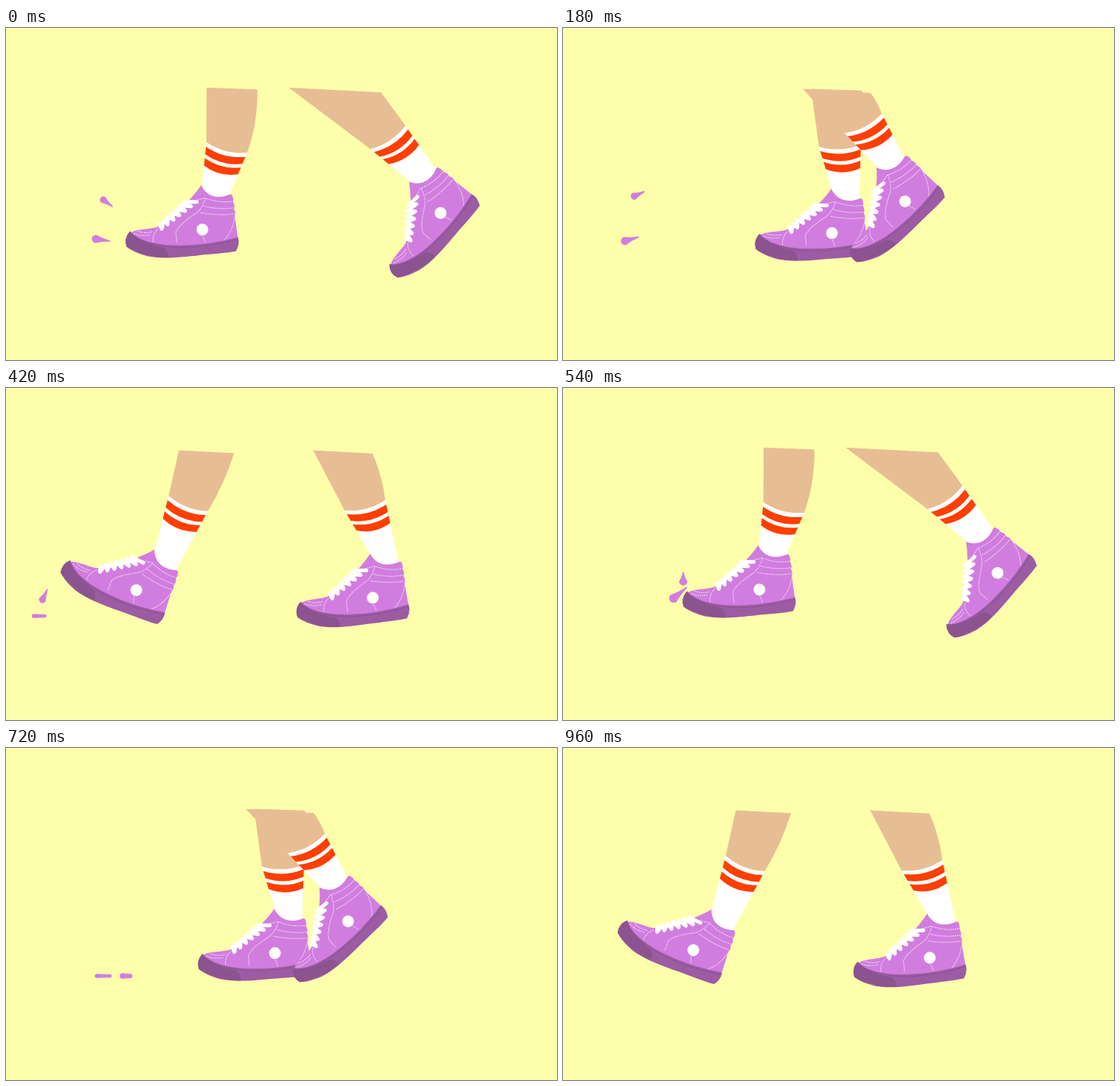
Write an HTML page that moves like this. It is 747x450 px and loops after 1.02 s.

```html
<!DOCTYPE html>
<html lang="en">
<head>
<meta charset="utf-8">
<title>Walking sneakers</title>
<style>
  html, body { margin: 0; width: 100%; height: 100%; overflow: hidden; background: #feffab; }
  svg { display: block; width: 100%; height: 100%; }
  .skin { fill: #e7be94; }
  .sock, .dot { fill: #fff; }
  .band { fill: #ff3f00; }
  .upper, .drop { fill: #d17ddf; }
  .sole { fill: #9c5ca4; }
  .toe { fill: #8b538f; }
  .seam { fill: none; stroke: #8b538f; stroke-width: 1; }
  .stitch { fill: none; stroke: #fff; stroke-width: 1; stroke-dasharray: 2 1; opacity: .75; }
  .lace { fill: none; stroke: #fff; stroke-width: 5; stroke-linecap: round; stroke-linejoin: round; }
</style>
</head>
<body>
<svg id="stage" viewBox="0 0 747 450"></svg>
<script>
const STEP = 60, FRAMES = 17, HALF = 9, CYCLE = 18;
const FLOOR = 309, SPLAT_LIFE = 1.1;
const RAD = Math.PI / 180;
const stage = document.getElementById('stage');

// Key poses of one leg: time, shoe x, y, shoe turn, sock lean, calf lean, sock length
const POSES = [
  [0, 239.5, 289.5, -0.7, 14.6, 4.6, 64],
  [2, 309, 291, 0, -3, 0, 68],
  [5, 394, 300.5, 0, -8, -11.4, 74],
  [7, 471, 301.5, -2.5, -19, -21.4, 80],
  [9, 581, 281, -44.3, -42, -44.6, 74],
  [11, 522, 253, -51.5, -45.5, -45.5, 66],
  [14, 291, 296, -5, -5, -9.3, 79],
  [16, 145.5, 277, 25, 22.8, 18.5, 87]
];

// Flung drops: launch state per frame step
const DROPS = [
  { t0: 0, x: 132, y: 233, vx: -11.8, vy: -8.7, g: 2.34, r: 4.8, tail: 15 },
  { t0: 0, x: 122, y: 286, vx: -12.6, vy: -1.9, g: 0.93, r: 5.6, tail: 19 },
  { t0: 9, x: 163, y: 262, vx: 0, vy: 10, g: 2.34, r: 5.6, tail: 12 },
  { t0: 9, x: 150, y: 285, vx: -9, vy: 7.5, g: 2.34, r: 6.2, tail: 23 }
];

function add(parent, tag, cls, attrs = {}) {
  const el = document.createElementNS('http://www.w3.org/2000/svg', tag);
  el.setAttribute('class', cls);
  for (const k in attrs) el.setAttribute(k, attrs[k]);
  return parent.appendChild(el);
}
const setPath = (el, d) => el.setAttribute('d', d);
const pt = p => p[0].toFixed(2) + ' ' + p[1].toFixed(2);
const mix = (a, b, u) => a.map((v, i) => v + (b[i] - v) * u);
const polar = (p, deg, dist) => [p[0] + Math.sin(deg * RAD) * dist, p[1] - Math.cos(deg * RAD) * dist];
const along = (a, b, dist) => mix(a, b, dist / Math.hypot(b[0] - a[0], b[1] - a[1]));

// Curve command to b, bulging to the left of the way from a
function arc(a, b, bulge) {
  const dx = b[0] - a[0], dy = b[1] - a[1], k = bulge / Math.hypot(dx, dy);
  return `Q${pt([(a[0] + b[0]) / 2 + dy * k, (a[1] + b[1]) / 2 - dx * k])} ${pt(b)}`;
}

// Smooth periodic curve through the key poses
function poseAt(t) {
  const n = POSES.length;
  const key = i => {
    const k = POSES[(i + n) % n].slice();
    k[0] += CYCLE * Math.floor(i / n);
    return k;
  };
  let i = n - 1;
  while (POSES[i][0] > t) i--;
  const [p, a, b, q] = [key(i - 1), key(i), key(i + 1), key(i + 2)];
  const h = b[0] - a[0], u = (t - a[0]) / h, v = 1 - u;
  return a.map((x, j) => {
    const ma = (b[j] - p[j]) / (b[0] - p[0]) * h;
    const mb = (q[j] - x) / (q[0] - a[0]) * h;
    return v * v * (1 + 2 * u) * x + u * v * v * ma + u * u * (3 - 2 * u) * b[j] - u * u * v * mb;
  });
}

function laces() {
  let d = '';
  for (let i = 0; i < 7; i++) {
    d += `${i ? 'L' : 'M'}${278 + 5.6 * i} ${267 - 5 * i}L${281 + 8 * i} ${273.5 - 6 * i}`;
  }
  return d;
}

function makeShoe(parent) {
  const shoe = add(parent, 'g', 'shoe');
  const part = (cls, d) => add(shoe, 'path', cls, { d });
  part('upper', 'M238 279C243 273 262 274 274 271C290 264 303 246 314 239Q325 229 335 215' +
    'Q339 217 343 224Q346 229 352 229L366 230Q375 226 377 229Q379 234 378 238' +
    'Q381 243 379 248Q382 252 380 257L384 288L383 293Q300 305 250 295Z');
  part('stitch', 'M342 233Q360 240 378 237M338 243Q360 249 379 246M334 252Q360 257 380 254' +
    'M324 236L341 232Q335 249 326 254Q304 268 300 278L301 292' +
    'M333 279Q338 285 340 293M380 260Q376 279 365 290' +
    'M243 279Q254 284 266 281M248 276Q258 280 269 277M276 273Q268 280 269 291');
  add(shoe, 'circle', 'dot', { cx: 336, cy: 275, r: 8 });
  part('lace', laces());
  part('sole', 'M238 276C250 291 280 297 310 296C340 296 365 291 384 286Q387 295 381 305' +
    'C365 308 350 308 330 310C300 313 280 314 262 310.5C250 307 240 303 233 297Q229 286 238 276Z');
  part('toe', 'M237 277C250 290 268 296 284 299Q289 303 290 312C275 313 250 307 233 297Q229 286 237 277Z');
  part('seam', 'M240 281C255 294 285 299 310 299C340 299 365 294 384 289');
  return shoe;
}

function makeLeg() {
  const skin = add(stage, 'path', 'skin');
  const shoe = makeShoe(stage);
  const sock = add(stage, 'path', 'sock');
  const bands = [0, 1].map(() => add(stage, 'path', 'band'));

  return t => {
    const [, x, y, turn, lean, calf, length] = poseAt(t);
    const cos = Math.cos(turn * RAD), sin = Math.sin(turn * RAD);
    const local = (u, v) => [x + u * cos - v * sin, y + u * sin + v * cos];
    shoe.setAttribute('transform', `translate(${x} ${y}) rotate(${turn}) translate(-309 -291)`);

    // Sock: from the shoe opening up to a tilted cuff
    const front = local(27, -74), back = local(64, -63);
    const cuff = polar(local(44.5, -65), lean, length), tilt = lean * .85 + 2;
    const left = polar(cuff, tilt - 90, 28.5), right = polar(cuff, tilt + 90, 28.5);
    setPath(sock, `M${pt(left)}${arc(left, right, -10)}L${pt(back)}` +
      `C${pt(local(52, -58))} ${pt(local(36, -58))} ${pt(front)}Z`);
    bands.forEach((band, i) => {
      const near = 6 + 15.5 * i, far = near + 10.3;
      const a = along(left, front, near), b = along(right, back, near);
      const c = along(right, back, far), d = along(left, front, far);
      setPath(band, `M${pt(a)}${arc(a, b, -10)}L${pt(c)}${arc(c, d, 10)}Z`);
    });

    // Calf: flares upward and is cut off at a level that bobs with each step
    const bend = Math.abs(calf), flare = 4 + bend * .1;
    const top = 84 - 3 * Math.cos((t - 1) / HALF * 2 * Math.PI);
    const cut = (p, deg, level) => [p[0] + Math.tan(deg * RAD) * (p[1] - level), level];
    const a = cut(left, calf - flare, top - 1), b = cut(right, calf + flare, top + 1 + bend * .1);
    setPath(skin, `M${pt(a)}L${pt(b)}${arc(b, right, 9 * (1 - bend / 46))}${arc(right, left, 10)}Z`);
  };
}

// Rounded shape from a thick end at (x, y) to a thin end len away along (ux, uy)
function blob(x, y, ux, uy, len, r, q) {
  const at = (d, side) => pt([x + ux * d - uy * side, y + uy * d + ux * side]);
  const w = r * .25 + q * .75, m = len * .45;
  return `M${at(0, r)}Q${at(m, w)} ${at(len, q)}A${q} ${q} 0 0 0 ${at(len, -q)}` +
    `Q${at(m, -w)} ${at(0, -r)}A${r} ${r} 0 0 0 ${at(0, r)}Z`;
}

function makeDrop({ t0, x, y, vx, vy, g, r, tail }) {
  const el = add(stage, 'path', 'drop');
  const landing = (Math.sqrt(vy * vy + 4 * g * (FLOOR - y)) - vy) / (2 * g);
  return t => {
    const age = t - t0, rest = age - landing;
    if (age < 0 || rest > SPLAT_LIFE) return setPath(el, '');
    if (rest > 0) {
      const size = 1 - .35 * rest, half = tail * .8 * size, thick = r * .7 * size;
      const mid = x + vx * landing;
      return setPath(el, blob(mid - half + thick, FLOOR, 1, 0, 2 * (half - thick), thick, thick * .8));
    }
    // The tail trails behind the direction of flight
    const fall = vy + 2 * g * age, speed = Math.hypot(vx, fall);
    setPath(el, blob(x + vx * age, y + vy * age + g * age * age, -vx / speed, -fall / speed, tail, r, .8));
  };
}

const drops = DROPS.map(makeDrop);
const planted = makeLeg(), swinging = makeLeg();

function draw(ms) {
  const f = Math.floor(ms / STEP) % FRAMES;
  planted(f % HALF);
  swinging(f % HALF + HALF);
  drops.forEach(drop => drop(f));
}

const start = performance.now();
function tick() {
  draw(performance.now() - start);
  requestAnimationFrame(tick);
}
tick();
</script>
</body>
</html>
```
